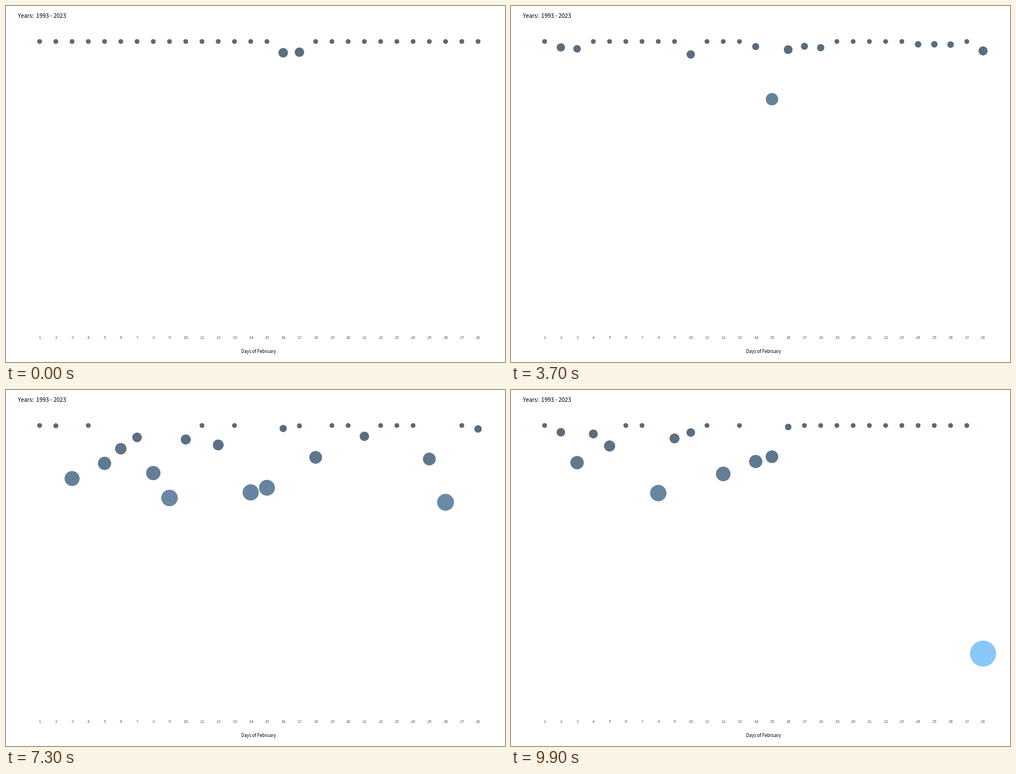
Animation, 885 px wide and 632 px high, one loop 10 s. Source, as a matplotlib script:

```python
import numpy as np
import matplotlib.pyplot as plt
from matplotlib.animation import FuncAnimation

W, H, DPI = 885, 632, 100
PX = 72 / DPI                      # points per pixel
FRAMES, INTERVAL = 100, 100
TOP, PEAK = 63, 405
ALPHA, STROKE = 0.7, 0.5
DARK, LIGHT = np.array([[19, 43, 67], [86, 177, 247]]) / 255
FONT = "Noto Sans CJK JP"

DAYS = np.arange(1, 29)
X = 59.6 + 28.8 * (DAYS - 1)

# Showers that set in at each state: day -> drop below the top line
SHOWERS = [
    {16: 20, 17: 19},
    {2: 9, 16: 19, 24: 10, 25: 10, 26: 11, 28: 22},
    {2: 12, 3: 26, 10: 46, 14: 18, 15: 205, 17: 17, 18: 22},
    {3: 97, 5: 70, 6: 43, 7: 22, 8: 88, 9: 134, 12: 36, 14: 123,
     18: 58, 21: 20, 25: 62, 26: 142},
    {2: 12, 3: 66, 4: 15, 8: 120, 9: 23, 12: 86, 28: PEAK},
]
LINGER = np.isin(DAYS, [5, 10, 14, 15, 16, 28])   # days that dry out slowly
FADE = 0.52
# Whole frames nearest to an even split of the loop
KEYS = np.round(np.linspace(1, FRAMES, len(SHOWERS))).astype(int) - 1


def build_states():
    rows = []
    drop = np.zeros(len(DAYS))
    for shower in SHOWERS:
        fresh = np.array([shower.get(day, 0) for day in DAYS])
        drop = np.where(fresh > 0, fresh, drop * FADE * LINGER)
        rows.append(drop)
    return np.array(rows)


DROPS = build_states()
RADII = 4.2 + 18.8 * np.sqrt(DROPS / PEAK)


def tween(rows, frame):
    i = min(np.searchsorted(KEYS, frame, side="right") - 1, len(KEYS) - 2)
    t = (frame - KEYS[i]) / (KEYS[i + 1] - KEYS[i])
    return rows[i] + (rows[i + 1] - rows[i]) * t


def shade(drop):
    rgb = DARK + (LIGHT - DARK) * (drop / PEAK)[:, None]
    return np.column_stack([rgb, np.full(len(drop), ALPHA)])


fig = plt.figure(figsize=(W / DPI, H / DPI), dpi=DPI, facecolor="white")
ax = fig.add_axes([0, 0, 1, 1])
ax.set_xlim(0, W)
ax.set_ylim(H, 0)
ax.axis("off")


def label(x, y, text, size, color="black", ha="center"):
    ax.text(x, y, text, fontsize=size * PX, color=color, ha=ha,
            va="baseline", family=FONT)


label(21, 21.3, "Years:  1993 - 2023", 10.1, ha="left")
label(448.3, 615.5, "Days of February", 7.9)
for day, x in zip(DAYS, X):
    label(x + .2, 591, str(day), 7.8, "#666666")

dots = ax.scatter(X, np.full(len(X), TOP), linewidths=STROKE * PX)


def draw(frame):
    drop = tween(DROPS, frame)
    radius = tween(RADII, frame) - STROKE / 2
    colors = shade(drop)
    dots.set_offsets(np.column_stack([X, TOP + drop]))
    dots.set_sizes((2 * radius * PX) ** 2)
    dots.set_facecolor(colors)
    dots.set_edgecolor(colors)
    return dots,


anim = FuncAnimation(fig, draw, frames=FRAMES, interval=INTERVAL,
                     repeat=True, repeat_delay=0)
plt.show()
```
